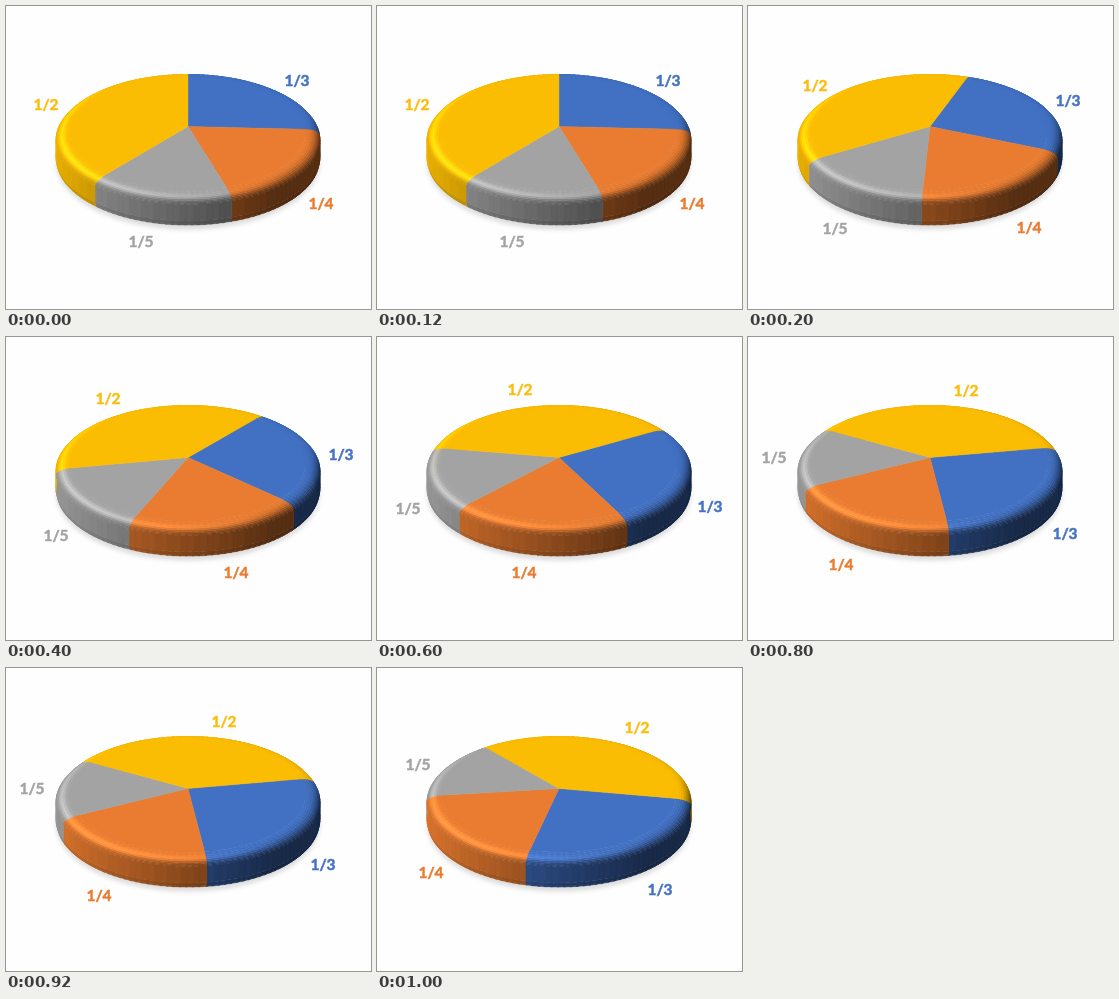
An HTML page with a canvas for the animation above (1200 ms loop, 365x303 px).

```html
<!DOCTYPE html>
<html lang="en">
<head>
<meta charset="utf-8">
<title>Rotating pie chart</title>
<style>
  html, body { margin: 0; width: 100%; height: 100%; overflow: hidden; background: #fefefe; }
  #stage { position: relative; width: 365px; height: 303px; overflow: hidden; }
  canvas { position: absolute; left: 0; top: 0; width: 365px; height: 303px; }
  span {
    position: absolute; left: 0; top: 0; width: 40px; margin: -10.7px 0 0 -20px;
    font: bold 15.5px/20px Lato, "Open Sans", sans-serif; text-align: center; white-space: nowrap;
    -webkit-text-stroke: 0.5px currentColor;
  }
</style>
</head>
<body>
<div id="stage"><canvas></canvas></div>
<script>
const STEP = 200, STEPS = 6, TURN = 20;
const W = 365, H = 303, RAD = Math.PI / 180;

// Label centres, one x,y pair per step
const slices = [
  { text: '1/3', value: 0.33, rgb: [66, 113, 195], ink: '#4472c4',
    path: [291, 75, 320, 95, 335, 118, 333, 170, 317, 197, 283, 222] },
  { text: '1/4', value: 0.25, rgb: [233, 124, 48], ink: '#e97c30',
    path: [315, 198, 281, 222, 230, 236, 147, 236, 93, 228, 54, 205] },
  { text: '1/5', value: 0.2, rgb: [163, 163, 163], ink: '#a3a3a3',
    path: [135, 236, 87, 223, 50, 199, 31, 172, 26, 121, 41, 97] },
  { text: '1/2', value: 0.5, rgb: [251, 189, 3], ink: '#fbbd0c',
    path: [40, 99, 67, 80, 102, 62, 143, 53, 218, 54, 260, 60] }
];

const stage = document.getElementById('stage');
const canvas = stage.firstElementChild;
const ctx = canvas.getContext('2d');
const dpr = window.devicePixelRatio || 1;
canvas.width = W * dpr;
canvas.height = H * dpr;
ctx.scale(dpr, dpr);

const total = slices.reduce((sum, s) => sum + s.value, 0);
let from = 0;
for (const s of slices) {
  s.start = from;
  s.end = from += 360 * s.value / total;
  s.label = document.createElement('span');
  s.label.textContent = s.text;
  s.label.style.color = s.ink;
  stage.append(s.label);
}

// Rim profile from the flat top down: radius, drop, slope in degrees
const INNER = 0.89, BEVEL = 5;
const rim = [];
for (let p = 0; p <= 90; p += 10) {
  rim.push({
    r: INNER + (1 - INNER) * Math.sin(p * RAD),
    drop: BEVEL * (1 - Math.cos(p * RAD)),
    slope: p
  });
}
rim.push({ r: 1, drop: 21.5, slope: 90 }, { r: 0.992, drop: 25.5, slope: 100 }, { r: 0.975, drop: 27.8, slope: 115 });

const clamp = (v, lo, hi) => Math.min(hi, Math.max(lo, v));

// Disc seen in perspective; angle runs clockwise from the back
function project(angle, r, drop) {
  const s = Math.sin(angle * RAD) * r, c = Math.cos(angle * RAD) * r;
  const depth = 1 + 0.14 * c;
  return [182 + 130.7 * s / depth, 120.5 - 62.7 * c / depth + drop];
}

function tone(rgb, angle, slope) {
  const s = Math.sin(angle * RAD), c = Math.cos(angle * RAD);
  const front = clamp(0.75 - 2 * c, 0.25, 1);
  const side = clamp(0.58 - 0.36 * s, 0.37, 1);
  const tilt = Math.sin(Math.min(slope, 90) * RAD) ** 2.4;
  const under = slope > 90 ? 0.92 : 1;
  const k = (1 + (side - 1) * front * tilt) * under;
  const shine = Math.max(0, Math.cos((angle - 228) * RAD)) * Math.exp(-(((slope - 36) / 16) ** 2));
  const lit = v => Math.min(255, Math.round(v * (k + 0.22 * shine) + 10 * shine));
  return `rgb(${rgb.map(lit).join()})`;
}

function fillPath(points, color) {
  ctx.beginPath();
  points.forEach(([x, y], i) => i ? ctx.lineTo(x, y) : ctx.moveTo(x, y));
  ctx.closePath();
  ctx.fillStyle = ctx.strokeStyle = color;
  ctx.fill();
  ctx.lineWidth = 0.4;
  ctx.stroke();
}

function ring(slice, turn, upper, lower) {
  const wall = upper.slope >= 90;
  const slope = (upper.slope + lower.slope) / 2;
  for (let a = slice.start; a < slice.end; a += 2.5) {
    // each piece reaches under the next so that no gap shows
    const b = Math.min(a + 3.2, slice.end);
    // flat facets five degrees wide on the wall
    const lit = wall ? slice.start + Math.floor((a - slice.start) / 5 + 0.01) * 5 + 2.5 : a + 1.25;
    fillPath([
      project(a + turn, upper.r, upper.drop), project(b + turn, upper.r, upper.drop),
      project(b + turn, lower.r, lower.drop), project(a + turn, lower.r, lower.drop)
    ], tone(slice.rgb, lit + turn, slope));
  }
}

function face(slice, turn) {
  const points = [project(0, 0, 0)];
  const n = 40;
  for (let i = 0; i <= n; i++) {
    points.push(project(slice.start + (slice.end - slice.start) * i / n + turn, INNER, 0));
  }
  fillPath(points, tone(slice.rgb, 0, 0));
}

function shadow() {
  ctx.save();
  ctx.filter = 'blur(2px)';
  ctx.fillStyle = 'rgba(0,0,0,.13)';
  ctx.beginPath();
  ctx.ellipse(182, 157, 132, 66.5, 0, 0, 2 * Math.PI);
  ctx.fill();
  ctx.restore();
}

function draw(step) {
  const turn = step * TURN;
  ctx.clearRect(0, 0, W, H);
  shadow();
  for (let i = rim.length - 1; i > 0; i--) {
    for (const s of slices) ring(s, turn, rim[i - 1], rim[i]);
  }
  for (const s of slices) face(s, turn);
  for (const s of slices) {
    s.label.style.transform = `translate(${s.path[2 * step]}px, ${s.path[2 * step + 1]}px)`;
  }
}

let shown = -1;
const began = performance.now();
function tick() {
  const step = Math.floor((performance.now() - began) / STEP) % STEPS;
  if (step !== shown) draw(shown = step);
  requestAnimationFrame(tick);
}
tick();
</script>
</body>
</html>
```
